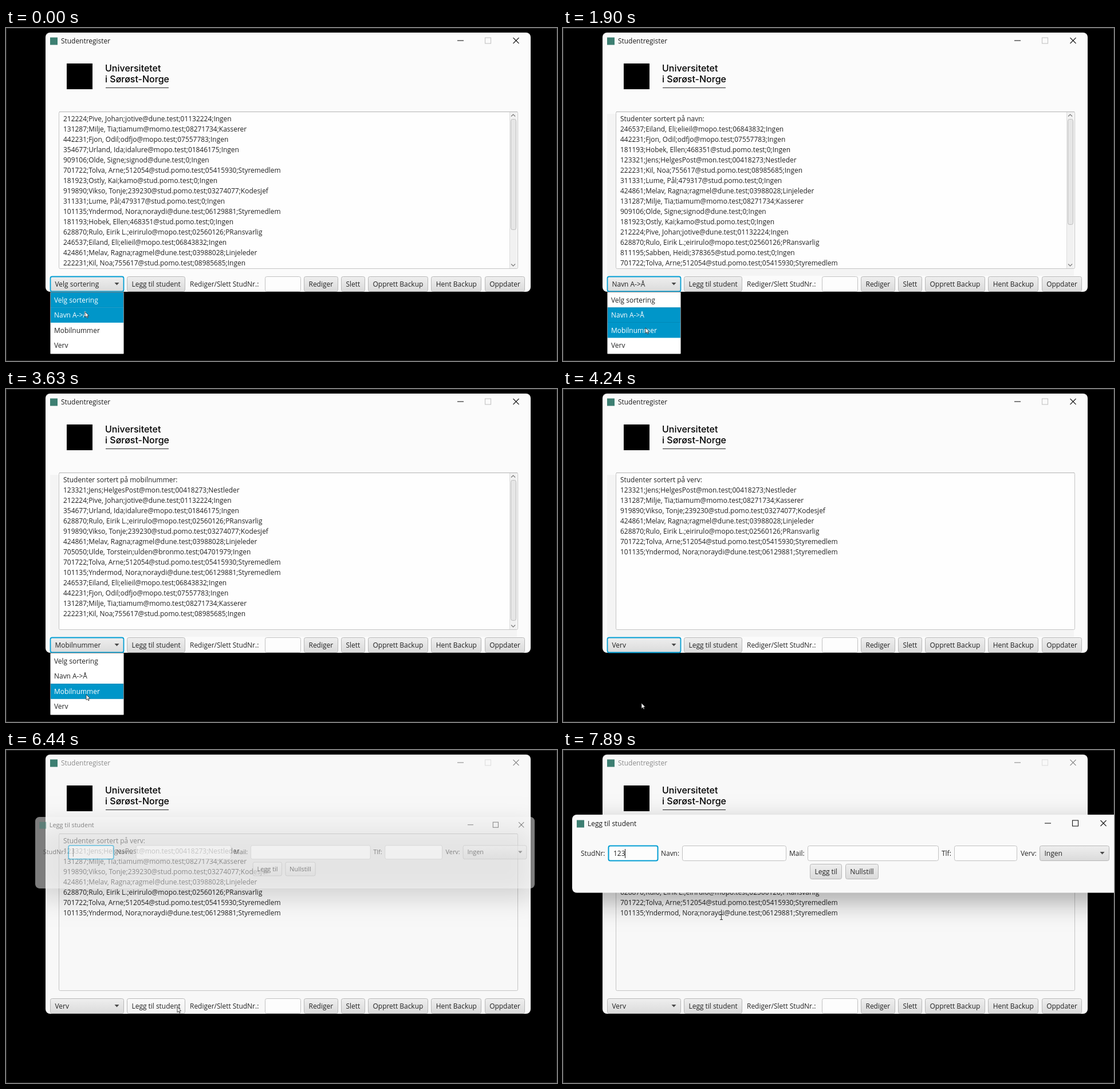
An HTML page with a canvas that plays this animation: 962x582 px, repeating every 8 s.

```html
<!DOCTYPE html>
<html lang="no">
<head>
<meta charset="utf-8">
<title>Studentregister</title>
<style>
html, body { margin: 0; width: 100%; height: 100%; overflow: hidden; background: #000; }
canvas { display: block; width: 962px; height: 582px; }
</style>
</head>
<body>
<canvas id="stage" width="962" height="582"></canvas>
<script>
const ctx = document.getElementById('stage').getContext('2d');
const LOOP = 8000, TICK = 130;
const UI_FONT = '11.95px "Open Sans", "Noto Sans", sans-serif';
const HEAD_FONT = '500 16px Inter, Roboto, sans-serif';
const INK = '#222', ACCENT = '#0096c9', FOCUS = '#039ed3', ICON = '#3d7f72';
const DIALOG_AT = 6440, TYPING_AT = 7490;
const CHOICES_AT = [150, 2170, 4240];

// id; name; mail (a bare domain gets a numeric user); rank by phone number; role
const students = `
212224;Pive, Johan;jotive@dune.test;1;Ingen
131287;Milje, Tia;tiamum@momo.test;11;Kasserer
442231;Fjon, Odil;odfjo@mopo.test;10;Ingen
354677;Urland, Ida;idalure@mopo.test;2;Ingen
909106;Olde, Signe;signod@dune.test;-;Ingen
701722;Tolva, Arne;@stud.pomo.test;7;Styremedlem
181923;Ostly, Kai;kamo@stud.pomo.test;-;Ingen
919890;Vikso, Tonje;@stud.pomo.test;4;Kodesjef
311331;Lume, Pål;@stud.pomo.test;-;Ingen
101135;Yndermod, Nora;noraydi@dune.test;8;Styremedlem
181193;Hobek, Ellen;@stud.pomo.test;-;Ingen
628870;Rulo, Eirik L.;eirirulo@mopo.test;3;PRansvarlig
246537;Eiland, Eli;elieil@mopo.test;9;Ingen
424861;Melav, Ragna;ragmel@dune.test;5;Linjeleder
222231;Kil, Noa;@stud.pomo.test;12;Ingen
811195;Sabben, Heidi;@stud.pomo.test;-;Ingen
705050;Ulde, Torstein;ulden@bronmo.test;6;Ingen
123321;Jens;HelgesPost@mon.test;0;Nestleder`.trim().split('\n').map(record => {
  const [id, name, mail, rank, role] = record.split(';');
  const user = mail[0] === '@' ? id * 7 % 900000 + 100000 : '';
  const phone = rank === '-' ? '0' : String(418273 + rank * 713951).padStart(8, '0');
  return { name, phone, role, row: [id, name, user + mail, phone, role].join(';') };
});

const roles = ['Nestleder', 'Kasserer', 'Kodesjef', 'Linjeleder', 'PRansvarlig', 'Styremedlem'];
const roleRank = s => roles.indexOf(s.role);
const by = key => (a, b) => a[key] < b[key] ? -1 : 1;
const listing = (label, found) => ({ label, rows: [`Studenter sortert på ${label}:`, ...found.map(s => s.row)] });

const views = [
  { name: 'Velg sortering', rows: students.map(s => s.row) },
  { name: 'Navn A->Å', ...listing('navn', [...students].sort(by('name'))) },
  { name: 'Mobilnummer', ...listing('mobilnummer', students.filter(s => s.phone !== '0').sort(by('phone'))) },
  { name: 'Verv', ...listing('verv', students.filter(s => roleRank(s) >= 0).sort((a, b) => roleRank(a) - roleRank(b))) }
];

// Pointer moves after its first rest: start, end, x, y.
const rest = [138, 496];
const moves = [
  [690, 950, 142, 452], [1370, 1900, 144, 524], [2300, 2830, 155, 454],
  [3280, 3780, 137, 549], [4400, 5220, 186, 495], [5500, 5780, 332, 437],
  [5900, 6250, 299, 449], [6570, 6930, 276, 292]
];

const within = (t, a, b) => t >= a && t < b;
const smooth = p => p * p * (3 - 2 * p);
const ticks = ms => Math.floor(ms / TICK);

function pointerAt(t) {
  let [x, y] = rest;
  for (const [start, end, toX, toY] of moves) {
    if (t < start) break;
    const p = smooth(Math.min(1, (ticks(t - start) + 1) / (ticks(end - start) + 1)));
    x += (toX - x) * p;
    y += (toY - y) * p;
  }
  return [x, y];
}

function text(str, x, cy, color = INK, align = 'left', font = UI_FONT) {
  ctx.font = font;
  ctx.fillStyle = color;
  ctx.textAlign = align;
  ctx.fillText(str, x, cy + 4);
}

function rect(x, y, w, h, color) {
  ctx.fillStyle = color;
  ctx.fillRect(x, y, w, h);
}

function panel(x1, y1, x2, y2, fill, radius = 8) {
  ctx.beginPath();
  ctx.roundRect(x1, y1, x2 - x1, y2 - y1, radius);
  ctx.fillStyle = fill;
  ctx.fill();
}

function box(x1, y1, x2, y2, fill, stroke, radius = 3, width = 1) {
  panel(x1 + 0.5, y1 + 0.5, x2 - 0.5, y2 - 0.5, fill, radius);
  ctx.strokeStyle = stroke;
  ctx.lineWidth = width;
  ctx.stroke();
}

function line(color, width, ...points) {
  ctx.beginPath();
  points.forEach(p => ctx.lineTo(...p));
  ctx.strokeStyle = color;
  ctx.lineWidth = width;
  ctx.stroke();
}

function polygon(color, ...points) {
  ctx.beginPath();
  points.forEach(p => ctx.lineTo(...p));
  ctx.closePath();
  ctx.fillStyle = color;
  ctx.fill();
}

function raised(x1, y1, x2, y2, hover, focus) {
  const g = ctx.createLinearGradient(0, y1, 0, y2);
  g.addColorStop(0, hover ? '#fbfbfb' : '#efefef');
  g.addColorStop(1, hover ? '#f1f1f1' : '#dadada');
  box(x1, y1, x2, y2, g, focus ? FOCUS : '#b8b8b8', 3, focus ? 1.8 : 1);
}

// Draws buttons side by side, each as wide as its label needs.
function buttons(labels, x, y, hover) {
  ctx.font = UI_FONT;
  for (const label of labels) {
    const right = x + ctx.measureText(label).width + 17;
    raised(Math.round(x), y, Math.round(right), y + 27, hover);
    text(label, (x + right) / 2, y + 13.5, INK, 'center');
    x = right + 5.4;
  }
}

function combo(label, x1, x2, y, hover, focus) {
  raised(x1, y, x2, y + 27, hover, focus);
  text(label, x1 + 8.5, y + 13.5);
  const cx = x2 - 12.5, top = y + 11;
  polygon('#4a4a4a', [cx - 4, top], [cx + 4, top], [cx, top + 4.5]);
}

function input(x1, x2, y, focus) {
  box(x1, y, x2, y + 27, '#fdfdfd', focus ? FOCUS : '#c1c1c1', 3, focus ? 2 : 1);
}

function titleBar(title, x, cy, right, color, maxColor) {
  rect(x, cy - 6, 13, 13, ICON);
  text(title, x + 19, cy, color);
  const y = cy - 0.5;
  line(color, 1.1, [right - 128, y], [right - 117, y]);
  ctx.strokeStyle = maxColor;
  ctx.strokeRect(right - 79.5, y - 5, 10, 10);
  for (const d of [-5, 5]) line(color, 1.1, [right - 25.5 - d, y - 5], [right - 25.5 + d, y + 5]);
}

function scrollBar(rowCount) {
  rect(879, 147, 13, 273, '#f1f1f1');
  line('#dcdcdc', 1, [879.5, 147], [879.5, 420]);
  box(881, 159, 891, Math.round(159 + 3690 / rowCount), '#e6e6e6', '#bcbcbc');
  for (const [y, d] of [[151, 3.5], [416, -3.5]])
    line('#777', 1.1, [882, y + d], [885.5, y], [889, y + d]);
}

function list(rows, fill) {
  box(92, 146, 894, 421, fill, '#c4c4c4', 2);
  line('#b2b2b2', 1, [93, 146.5], [893, 146.5]);
  rows.slice(0, 15).forEach((row, i) => text(row, 100, 159 + i * 18));
  const rowCount = rows.length + 1;
  if (rowCount >= 15) scrollBar(rowCount);
}

function mainWindow(t, view, open, mx, my) {
  const active = t < DIALOG_AT;
  panel(69, 8, 916, 461, active ? '#fbfbfb' : '#f8f8f8');
  titleBar('Studentregister', 77, 22.5, 916, active ? '#1a1a1a' : '#8c8c8c', active ? '#c4c4c4' : '#dedede');

  rect(106, 62, 45, 45, '#000');
  text('Universitetet', 173, 71.5, '#000', 'left', HEAD_FONT);
  text('i Sørøst-Norge', 173, 90.5, '#000', 'left', HEAD_FONT);
  line('#222', 1, [174, 104.5], [284, 104.5]);

  if (within(t, CHOICES_AT[0], DIALOG_AT)) rect(77, 150, 815, 283, '#f4f4f4');
  list(view.rows, active ? '#fefefe' : '#f8f8f8');

  const over = (x1, x2) => within(mx, x1, x2) && within(my, 434, 461);
  combo(view.name, 77, 206, 434, over(77, 206) && !open, active);
  buttons(['Legg til student'], 211, 434, over(211, 316) && t < DIALOG_AT + TICK);
  text('Rediger/Slett StudNr.:', 321, 447.5);
  input(452, 515, 434);
  buttons(['Rediger', 'Slett', 'Opprett Backup', 'Hent Backup', 'Oppdater'], 520, 434);
}

function dropDown(selected, my) {
  box(77, 461, 206, 570, '#fff', '#8a8a8a', 1);
  views.forEach((view, i) => {
    const y = 462 + i * 26.5;
    const lit = i === selected || within(my, y, y + 26.5);
    if (lit) rect(78, y, 127, 26.5, ACCENT);
    if (i === selected) {
      ctx.strokeStyle = '#0089b8';
      ctx.strokeRect(78.5, y + 0.5, 126, 25.5);
    }
    text(view.name, 84, y + 13.5, lit ? '#fff' : INK);
  });
}

function dialog(t) {
  const remaining = Math.max(0, 1 - ticks(t - DIALOG_AT) / 2) ** 2;
  const scale = 1 - 0.085 * remaining;
  const typed = '123'.slice(0, Math.max(0, Math.floor((t - TYPING_AT) / 200) + 1));
  ctx.save();
  ctx.translate(428, 160);
  ctx.scale(scale, scale);
  ctx.translate(-428, -160);
  ctx.globalAlpha = 1 - 0.5 * remaining;

  ctx.shadowColor = 'rgba(0,0,0,.32)';
  ctx.shadowBlur = 44;
  ctx.shadowOffsetY = 16;
  panel(16, 113, 969, 249.5, '#f9f9f9');
  ctx.shadowColor = 'transparent';

  titleBar('Legg til student', 24, 128.5, 969, '#1a1a1a', '#1a1a1a');
  text('StudNr:', 31, 180.5);
  input(79, 166, 167, true);
  text(typed, 88, 180.5);
  const caret = 88.5 + Math.round(ctx.measureText(typed).width);
  line('#222', 1, [caret, 173], [caret, 189]);
  text('Navn:', 171, 180.5);
  input(208, 390, 167);
  text('Mail:', 395, 180.5);
  input(427, 656, 167);
  text('Tlf:', 661, 180.5);
  input(683, 793, 167);
  text('Verv:', 799, 180.5);
  combo('Ingen', 832, 954, 167);
  buttons(['Legg til', 'Nullstill'], 431, 199);
  ctx.restore();
}

function drawPointer(x, y) {
  ctx.save();
  ctx.translate(Math.round(x), Math.round(y));
  if (y < 421) {
    for (const end of [-4.5, 4.5]) line('#333', 1, [-2, end], [3, end]);
    line('#333', 1, [0.5, -5], [0.5, 5]);
  } else {
    polygon('#fff', [0, 0], [0, 9.5], [2.2, 7.5], [3.8, 10.8], [5.2, 10.1], [3.7, 7], [6.6, 6.8]);
    ctx.strokeStyle = '#222';
    ctx.lineWidth = 0.8;
    ctx.stroke();
  }
  ctx.restore();
}

function draw(t) {
  const [mx, my] = pointerAt(t);
  const selected = CHOICES_AT.filter(c => t >= c).length;
  const open = [-Infinity, 1240, 3110].some((start, i) => within(t, start, CHOICES_AT[i]));

  rect(0, 0, 962, 582, '#000');
  ctx.strokeStyle = '#2c2c2c';
  ctx.lineWidth = 1;
  ctx.strokeRect(0.5, 0.5, 961, 581);
  mainWindow(t, views[selected], open, mx, my);
  ctx.lineWidth = 1;
  if (open) dropDown(selected, my);
  if (t >= DIALOG_AT) dialog(t);
  drawPointer(mx, my);
}

const start = performance.now();
function frame() {
  draw((performance.now() - start) % LOOP);
  requestAnimationFrame(frame);
}
frame();
</script>
</body>
</html>
```
